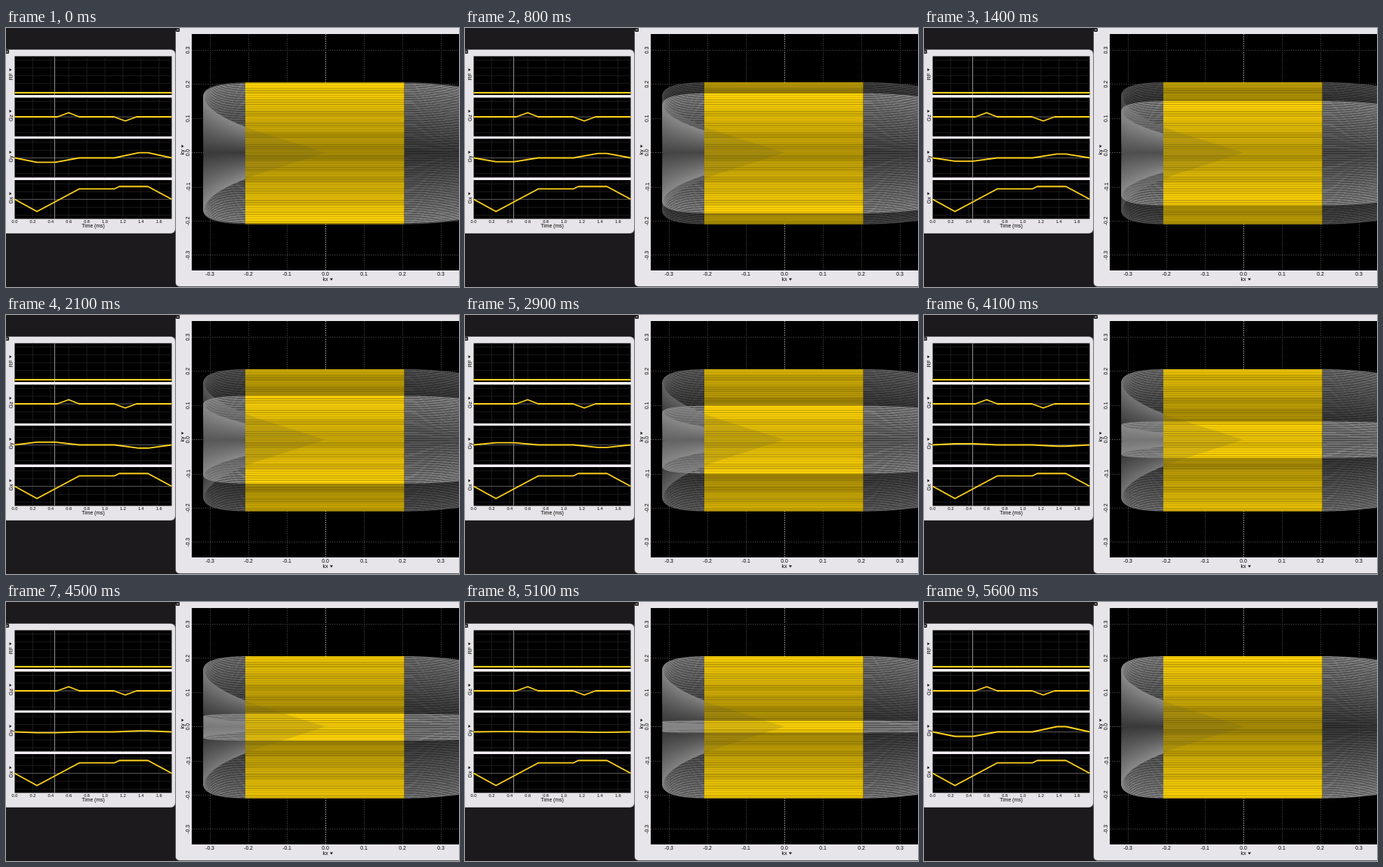
Write an HTML page with a canvas that moves like this. It is 600x344 px and loops after 5700 ms.

```html
<!DOCTYPE html>
<html lang="en">
<head>
<meta charset="utf-8">
<title>Gradient waveforms and k-space</title>
<style>
html, body { margin: 0; width: 100%; height: 100%; overflow: hidden; background: #1c1a1d; }
svg, canvas { position: absolute; display: block; }
svg { left: 0; top: 0; }
canvas { left: 246px; top: 8px; }
text { font-family: "Liberation Sans", Arial, sans-serif; fill: #000; text-anchor: middle; }
</style>
</head>
<body>
<svg id="stage" width="600" height="344" viewBox="0 0 600 344"></svg>
<canvas id="kspace" width="354" height="314"></canvas>
<script>
const STEP = 100, FRAMES = 57, LINES = 128;
const YELLOW = '#ffd21c';
const svg = document.getElementById('stage');

function add(tag, attrs, text) {
  const el = document.createElementNS('http://www.w3.org/2000/svg', tag);
  for (const key in attrs) el.setAttribute(key, attrs[key]);
  if (text) el.textContent = text;
  svg.append(el);
  return el;
}
const rect = (x, y, width, height, fill, rx = 0) => add('rect', { x, y, width, height, fill, rx });
const line = (x1, y1, x2, y2, stroke, extra = {}) => add('line', { x1, y1, x2, y2, stroke, ...extra });

function label(text, x, y, size, turned) {
  const attrs = { x, y, 'font-size': size };
  if (turned) attrs.transform = `rotate(-90 ${x} ${y})`;
  add('text', attrs, text);
}
function arrow(x, y, turned) {
  const d = turned ? `M${x - 1.5} ${y + 2}v-4l3 2z` : `M${x - 2} ${y - 1.5}h4l-2 3z`;
  add('path', { d, fill: '#111' });
}
function closeMark(x, y) {
  rect(x - 2.5, y - 2.5, 5, 5, '#050505', 1);
  add('path', { d: `M${x - 1.5} ${y - 1.5}l3 3m0 -3l-3 3`, stroke: '#eee', 'stroke-width': 0.8 });
}

// Waveforms as [x, height] corner points in pixels
const GX = [[11.5, 0], [41, -16.3], [97, 13.8], [143.5, 13.8], [150, 17], [188, 17], [219.5, 0]];
const GY = [[11.5, 0], [41, 6], [65, 6], [97, 0], [143.5, 0], [176, -7], [188, -7], [219.5, 0]];
const GZ = [[11.5, 0], [68, 0], [83, 5.5], [97, 0], [143, 0], [158, -5.5], [173, 0], [219.5, 0]];
const RF = [[11.5, 0], [219.5, 0]];

const wavePoints = (wave, base, gain = 1) =>
  wave.map(([x, h]) => `${x},${(base - h * gain).toFixed(2)}`).join(' ');

// Left window
rect(-6, 28.5, 230.5, 244.5, '#8f8f92', 6);
rect(-6, 29, 230, 243.5, '#e6e4e8', 6);
rect(11.5, 37.5, 208, 216, '#f3eff5');

const rows = [
  ['RF', 37.5, 86, RF], ['Gz', 92.5, 118, GZ],
  ['Gy', 147, 172.5, GY], ['Gx', 202, 227.5, GX]
];
let gyCurve;
for (const [name, top, base, wave] of rows) {
  rect(11.5, top, 208, 51.5, '#000');
  for (let i = 1; i < 9; i++) line(11.5 + i * 23.9, top, 11.5 + i * 23.9, top + 51.5, '#262626', { 'stroke-width': 0.7 });
  for (let y = top + 5; y < top + 51; y += 10.4) line(11.5, y, 219.5, y, '#262626', { 'stroke-width': 0.7 });
  line(11.5, base, 219.5, base, '#707070', { 'stroke-width': 0.7 });
  line(64.5, top, 64.5, top + 51.5, '#8c8c8c');
  const curve = add('polyline', {
    points: wavePoints(wave, base), fill: 'none', stroke: YELLOW, 'stroke-width': 1.8, 'stroke-linejoin': 'round'
  });
  if (name === 'Gy') gyCurve = curve;
  label(name, 8.5, top + 27, 7, true);
  arrow(6, top + 18, true);
}
for (let i = 0; i < 9; i++) label((i * 0.2).toFixed(1), 11.5 + i * 23.9, 259, 5.6);
label('Time (ms)', 115.5, 265, 6.8);
closeMark(1.5, 31.5);

// Right window
const ORIGIN = 165.6;
rect(224.5, -0.5, 390, 344, '#8f8f92', 5);
rect(225, 0, 390, 343, '#e7e5e9', 5);
rect(246, 8, 354, 314, '#000');
for (let i = -3; i <= 3; i++) {
  const x = 423 + i * 51, y = ORIGIN - i * 45.4;
  const style = { 'stroke-dasharray': '1.5 1.5', 'stroke-width': 1 };
  line(Math.floor(x) + 0.5, 8, Math.floor(x) + 0.5, 322, i ? '#3c3c3c' : '#a8a8a8', style);
  line(246, Math.floor(y) + 0.5, 600, Math.floor(y) + 0.5, i ? '#3c3c3c' : '#5a5a5a', style);
  label((i / 10).toFixed(1), x, 328.5, 6.8);
  label((i / 10).toFixed(1), 243.5, y, 6.8, true);
}
label('kx', 423, 336, 7);
arrow(431, 334, false);
label('ky', 236, 165, 7, true);
arrow(234, 157, true);
closeMark(227.5, 2.5);

// K-space path: running integrals of the gradients
function heightAt(wave, x) {
  for (let i = 1; i < wave.length; i++) {
    const [x0, h0] = wave[i - 1], [x1, h1] = wave[i];
    if (x <= x1) return h0 + (h1 - h0) * (x - x0) / (x1 - x0);
  }
  return 0;
}
const path = [];
{
  const dx = 0.5;
  let kx = 0, ky = 0;
  for (let x = 11.5; x < 165; x += dx) {
    path.push({ x, kx: 177 + kx * 0.3305, ky });
    kx += heightAt(GX, x + dx / 2) * dx;
    ky += heightAt(GY, x + dx / 2) * dx;
  }
  const peak = path.find(p => p.x >= 100).ky;
  for (const p of path) p.ky /= peak;
}
const prephase = path.filter(p => p.x <= 60);
const incoming = path.filter(p => p.x <= 98);
const outgoing = path.filter(p => p.x >= 142);

const ctx = document.getElementById('kspace').getContext('2d');
const MID = ORIGIN - 8, GAP = 1.475, LEFT = 71, RIGHT = 281.5;
const lineY = k => MID - k * GAP;

// Phase steps alternate in sign, from the outside in
const phase = n => n % 2 ? 63 - (n - 1) / 2 : n / 2 - 64;

function trace(points, k) {
  ctx.beginPath();
  for (const p of points) ctx.lineTo(p.kx, lineY(k * p.ky));
  ctx.stroke();
}

function within(x, width, paint) {
  ctx.save();
  ctx.beginPath();
  ctx.rect(x, 0, width, 314);
  ctx.clip();
  paint();
  ctx.restore();
}

function draw(frame) {
  const current = Math.floor(frame * 2.26 + 2.38) % LINES;
  gyCurve.setAttribute('points', wavePoints(GY, 172.5, phase(current) / 64));

  const order = [];
  for (let age = LINES - 1; age >= 0; age--) {
    order.push({ k: phase((current + age) % LINES), fresh: 1 - age / LINES });
  }
  const paintGrey = points => {
    ctx.globalCompositeOperation = 'lighten';
    ctx.lineWidth = 1.3;
    for (const { k, fresh } of order) {
      const grey = Math.round(56 + 80 * fresh);
      ctx.strokeStyle = `rgb(${grey},${grey},${grey})`;
      trace(points, k);
    }
  };
  ctx.clearRect(0, 0, 354, 314);
  within(0, LEFT, () => paintGrey(incoming));
  within(RIGHT, 354 - RIGHT, () => paintGrey(outgoing));

  // Sampled part of each line
  ctx.fillStyle = '#000';
  ctx.fillRect(LEFT, lineY(63), RIGHT - LEFT, 127 * GAP);
  ctx.lineWidth = 1.6;
  for (const { k, fresh } of order) {
    ctx.strokeStyle = `rgba(255,212,8,${0.6 + 0.4 * fresh})`;
    ctx.beginPath();
    ctx.moveTo(LEFT, lineY(k));
    ctx.lineTo(RIGHT, lineY(k));
    ctx.stroke();
  }

  // Shade of the diverging lines over the sampled area
  within(LEFT, RIGHT - LEFT, () => {
    ctx.fillStyle = 'rgba(105,95,40,0.2)';
    ctx.beginPath();
    for (const p of prephase) ctx.lineTo(p.kx, lineY(63 * p.ky));
    for (const p of [...prephase].reverse()) ctx.lineTo(p.kx, lineY(-64 * p.ky));
    ctx.fill();
  });
}

let shown = -1;
const start = performance.now();
function tick() {
  const frame = Math.floor((performance.now() - start) / STEP) % FRAMES;
  if (frame !== shown) draw(shown = frame);
  requestAnimationFrame(tick);
}
tick();
</script>
</body>
</html>
```
